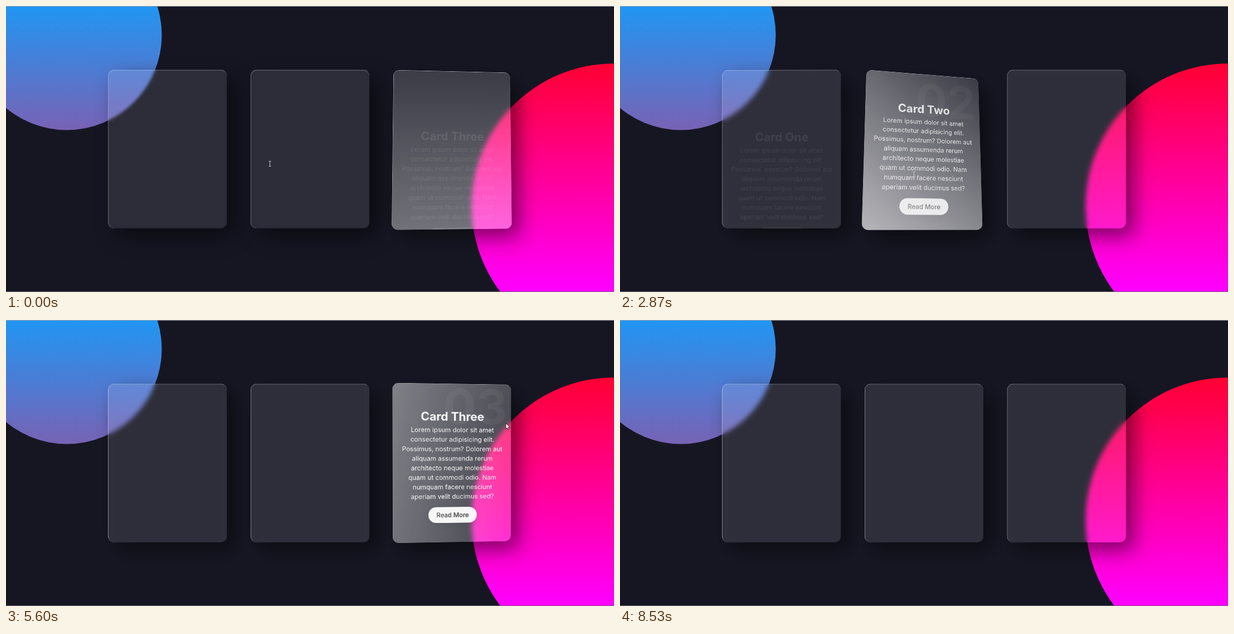
An HTML page that plays this animation: 1091x513 px, repeating every 9670 ms.

```html
<!DOCTYPE html>
<html lang="en">
<head>
<meta charset="utf-8">
<title>Glass cards</title>
<style>
* { box-sizing: border-box; margin: 0; padding: 0; }
html, body { width: 100%; height: 100%; overflow: hidden; background: #a2a2a8; }
body { position: relative; }
#page {
  position: absolute; top: 1px; left: 0; width: 1536px; height: 719.5px;
  display: flex; justify-content: center; align-items: center; overflow: hidden;
  transform: scale(.71029); transform-origin: 0 0;
  background: #161623; font: 400 16.4px/24px Inter, sans-serif; color: #fff;
}
.blob { position: absolute; inset: 0; }
.red { background: linear-gradient(#f00, #f0f); clip-path: circle(30% at right 70%); }
.blue { background: linear-gradient(#2196f3, #e91e63); clip-path: circle(20% at 10% 10%); }
.card {
  position: relative; width: 300px; height: 400px; margin: 30px; overflow: hidden;
  display: flex; justify-content: center; align-items: center;
  border-radius: 15px; background: rgba(255,255,255,.1);
  border-top: 1px solid rgba(255,255,255,.5); border-left: 1px solid rgba(255,255,255,.5);
  box-shadow: 20px 20px 50px rgba(0,0,0,.5); backdrop-filter: blur(4px);
}
.content { position: relative; width: 100%; padding: 20px 0; text-align: center; white-space: nowrap; }
h2 { position: absolute; top: -46px; right: 10px; font: 700 124px/1 Inter, sans-serif; color: rgba(255,255,255,.05); }
h3 { font: 700 29.5px/43px Inter, sans-serif; }
.more {
  display: block; width: max-content; margin: 15px auto 0; padding: 8px 20px; border-radius: 20px;
  background: #fff; color: #000; font-size: 16px; font-weight: 500; box-shadow: 0 5px 15px rgba(0,0,0,.2);
}
.glare {
  position: absolute; left: 50%; top: 50%; width: 600px; height: 600px; margin: -300px;
  background: linear-gradient(0deg, rgba(255,255,255,0), #fff);
}
#cursor { position: absolute; left: 0; top: 0; width: 1px; height: 1px; overflow: visible; }
</style>
</head>
<body>
<div id="page"><div class="blob red"></div><div class="blob blue"></div></div>
<svg id="cursor">
  <path id="arrow" d="M0 0V10.5L2.4 8.3 4 12 5.6 11.3 4 7.7H7.2Z" fill="#fff" stroke="#111" stroke-width=".8"/>
  <path id="beam" d="M-2 -4.5H2M0 -4.5V4.5M-2 4.5H2" fill="none" stroke="#c8c8cc"/>
</svg>
<script>
const LOOP = 9670, LAG = 120, TILT = 25, TAU = 80, FADE = 500;
const W = 213, H = 284, TOP = 115, left = i => 183.3 + 255.7 * i;

// key points of the pointer's curve: time, x, y
const path = [
  [-40, 767, 298], [120, 474, 283], [870, 374, 290], [990, 337, 288], [1700, 215, 250],
  [2870, 492, 324], [3350, 615, 180], [3930, 500, 162], [4050, 525, 261], [5600, 781, 253],
  [5720, 897, 185], [6700, 740, 290], [7200, 831, 347], [7320, 853, 351], [8400, 720, 530]
];
// the tilt returns on leave, or at "back" if that is later
const hovers = [
  { card: 2, enter: -1500, leave: -310, back: -40 },
  { card: 1, enter: 60, leave: 330 },
  { card: 0, enter: 690, leave: 2545 },
  { card: 1, enter: 2610, leave: 5000 },
  { card: 2, enter: 5240, leave: 7780 }
];

const get = id => document.getElementById(id);
const clamp = v => Math.min(1, Math.max(0, v));

const cards = ['One', 'Two', 'Three'].map((name, i) => {
  const el = document.createElement('div');
  el.className = 'card';
  el.innerHTML = `<div class="content"><h2>0${i + 1}</h2><h3>Card ${name}</h3>
    <p>Lorem ipsum dolor sit amet<br>consectetur adipisicing elit.<br>Possimus, nostrum? Dolorem aut<br>
    aliquam assumenda rerum<br>architecto neque molestiae<br>quam ut commodi odio. Nam<br>
    numquam facere nesciunt<br>aperiam velit ducimus sed?</p>
    <span class="more">Read More</span></div><div class="glare"></div>`;
  get('page').append(el);
  return { el, content: el.firstChild, glare: el.lastChild };
});

// CSS "ease" curve, solved by bisection
function ease(x) {
  x = clamp(x);
  let lo = 0, hi = 1, s;
  for (let i = 0; i < 18; i++) {
    s = (lo + hi) / 2;
    if (.75 * s * (1 - s) + s ** 3 < x) lo = s; else hi = s;
  }
  return .3 * s * (1 - s) ** 2 + 3 * s * s * (1 - s) + s ** 3;
}

function slope(i, c) {
  const a = path[i - 1], b = path[i + 1];
  return a && b ? (b[c] - a[c]) / (b[0] - a[0]) : 0;
}

// smooth cubic through the key points
function pointer(t) {
  t = Math.min(Math.max(t, path[0][0]), path.at(-1)[0]);
  const i = Math.max(1, path.findIndex(p => p[0] >= t)) - 1, a = path[i], b = path[i + 1];
  const d = b[0] - a[0], u = (t - a[0]) / d, v = 1 - u;
  return [1, 2].map(c => a[c] * v * v * (1 + 2 * u) + b[c] * u * u * (3 - 2 * u)
    + d * u * v * (v * slope(i, c) - u * slope(i + 1, c)));
}

function drawCard({ el, content, glare }, i, t) {
  const hover = hovers.findLast(h => h.card === i && h.enter <= t);
  const { enter, leave, back = leave } = hover || { enter: Infinity, leave: Infinity };
  const show = hover ? ease((Math.min(t, leave) - enter) / FADE) * (1 - ease((t - leave) / FADE)) : 0;
  content.style.opacity = show;
  content.style.transform = `translateY(${100 * (1 - show)}px)`;

  const at = Math.min(t, back), [mx, my] = pointer(at);
  const k = hover ? (1 - Math.exp((enter - at) / TAU)) * Math.exp((at - t) / TAU) : 0;
  const x = clamp((mx - left(i)) / W), y = clamp((my - TOP) / H);
  const rx = k * TILT * (2 * y - 1), ry = k * TILT * (1 - 2 * x);
  el.style.transform = `perspective(1000px) rotateX(${rx}deg) rotateY(${ry}deg)`;
  const angle = t < back ? Math.atan2((x - .5) * W, (.5 - y) * H) : Math.PI;
  glare.style.transform = `rotate(${angle}rad)`;
  glare.style.opacity = k * y;
}

function drawCursor(t) {
  const [x, y] = pointer(t + LAG);
  const overText = y > 155 && y < 325 && cards.some((_, i) => x > left(i) + 14 && x < left(i) + W - 14);
  get('cursor').style.transform = `translate(${x}px,${y}px)`;
  get('beam').style.display = overText ? '' : 'none';
  get('arrow').style.display = overText ? 'none' : '';
}

const start = performance.now();
function frame() {
  const t = (performance.now() - start) % LOOP;
  cards.forEach((card, i) => drawCard(card, i, t));
  drawCursor(t);
  requestAnimationFrame(frame);
}
frame();
</script>
</body>
</html>
```
